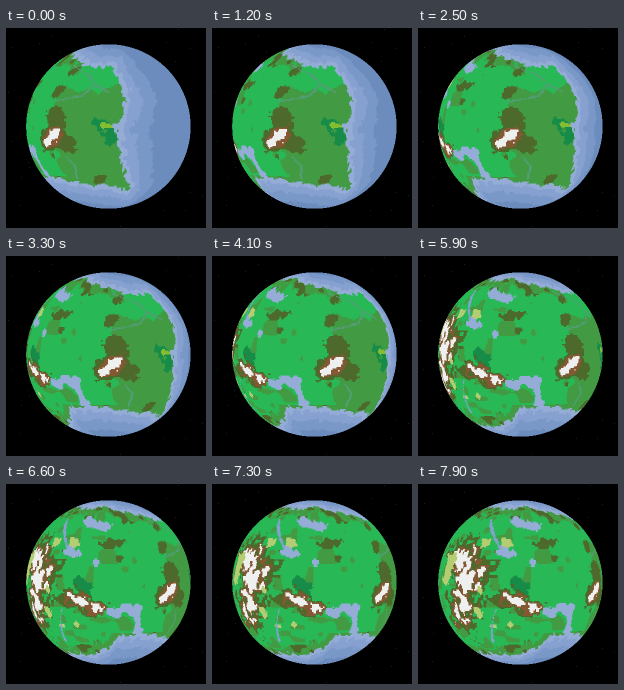
An HTML page with a canvas for the animation above (8000 ms loop, 200 by 200 pixels).

```html
<!DOCTYPE html>
<html lang="en">
<head>
<meta charset="utf-8">
<title>Rotating planet</title>
<style>
  html, body { margin: 0; width: 100%; height: 100%; overflow: hidden; background: #000; }
  canvas { display: block; width: 100vmin; height: 100vmin; }
</style>
</head>
<body>
<canvas id="stage" width="200" height="200"></canvas>
<script>
const LOOP = 8000, STEP = 100, SPIN = 13.87;   // ms, ms, degrees per second
const CX = 102.4, CY = 98.5, R = 82.2;
const TILT = 3 * Math.PI / 180, DEG = 180 / Math.PI;
const WEST = -210, COLS = 360, ROWS = 180;     // one map cell per degree

const color = {
  deep: [107, 140, 189], mid: [121, 152, 200], shallow: [134, 161, 207], shore: [148, 172, 214],
  bright: [40, 185, 86], green: [66, 155, 67], forest: [23, 140, 72], olive: [77, 105, 44],
  brown: [132, 88, 50], sand: [180, 204, 114], lime: [132, 189, 50], snow: [237, 240, 238],
  river: [82, 157, 118]
};

function hash(x, y, seed) {
  const v = Math.sin(x * 127.1 + y * 311.7 + seed * 74.7) * 43758.5453;
  return v - Math.floor(v);
}

// Smooth value noise between -0.5 and 0.5.
function noise(x, y, seed) {
  const ix = Math.floor(x), iy = Math.floor(y);
  const ease = t => t * t * (3 - 2 * t), mix = (a, b, t) => a + (b - a) * t;
  const row = j => mix(hash(ix, j, seed), hash(ix + 1, j, seed), ease(x - ix));
  return mix(row(iy), row(iy + 1), ease(y - iy)) - 0.5;
}

// Stage point to longitude and latitude, relative to the facing meridian.
function unproject(px, py) {
  const x = (px - CX) / R, y = (CY - py) / R;
  const z = Math.sqrt(Math.max(0, 1 - x * x - y * y));
  const lat = Math.asin(Math.max(-1, Math.min(1, y * Math.cos(TILT) + z * Math.sin(TILT))));
  const lon = Math.atan2(x, z * Math.cos(TILT) - y * Math.sin(TILT));
  return [lon * DEG, lat * DEG];
}

// Straight lines through a few key points.
function curve(keys) {
  return x => {
    const i = keys.findIndex(k => k[0] > x);
    if (i < 1) return keys[i === 0 ? 0 : keys.length - 1][1];
    const [[x0, y0], [x1, y1]] = [keys[i - 1], keys[i]];
    return y0 + (y1 - y0) * (x - x0) / (x1 - x0);
  };
}

const northCoast = curve([[-130, 67], [-95, 70], [-68, 62], [-50, 58], [-20, 51], [5, 48]]);
const southCoast = curve([[-112, -58], [-92, -51], [-82, -38], [-50, -37], [-14, -42], [20, -47]]);
const eastCoast = curve([[-42, 20], [-29, 11], [-10, 7], [3, 4], [14, 10], [26, 13], [46, 6]]);

// A band around a line of stage points seen at a given second; half widths in degrees.
function feature(sec, points, widths, rough = 5) {
  const line = points.map(([x, y]) => {
    const [lon, lat] = unproject(x, y);
    return [lon - SPIN * sec, lat];
  });
  return { line, widths: Object.entries(widths), rough };
}

const spots = (sec, points, widths, rough) => points.map(p => feature(sec, [p], widths, rough));

const features = [
  feature(0, [[95, 153]], { olive: 4 }),
  feature(0, [[88, 94], [104, 100], [105, 114]], { forest: 3 }),
  feature(0, [[98, 98], [111, 98]], { lime: 1.4 }, 2),
  feature(0, [[68, 37], [83, 47], [88, 56], [104, 65]], { river: 0.6 }, 1),
  feature(0, [[48, 73], [76, 68], [88, 57]], { river: 0.6 }, 1),
  feature(2.5, [[103, 128], [112, 138], [110, 151]], { river: 0.6 }, 1),
  feature(2.5, [[90, 90], [99, 90]], { olive: 6 }),
  feature(2.5, [[82, 115], [98, 106]], { olive: 9, brown: 5, snow: 3 }),
  feature(2.5, [[109, 116]], { olive: 6 }),
  feature(4.1, [[118, 65]], { olive: 4.5 }),
  feature(5.9, [[89, 60], [101, 59]], { olive: 4 }),
  feature(5.9, [[100, 74]], { olive: 2.5 }, 3),
  feature(7.9, [[100, 100], [106, 110]], { forest: 4 }),
  feature(7.9, [[82, 112], [97, 118], [114, 123]], { olive: 6.5 }, 8),
  feature(7.9, [[90, 115], [116, 124]], { brown: 4.5, snow: 2 }, 7),
  feature(7.9, [[42, 72], [55, 92], [42, 130]], { olive: 15, brown: 9, snow: 5.5 }, 15),
  feature(7.9, [[32, 78], [28, 95]], { sand: 6 }, 6),
  ...spots(7.9, [[68, 58], [90, 58], [60, 129]], { sand: 3.5 }, 4),
  ...spots(7.9, [[62, 107], [75, 142], [92, 141]], { sand: 2.2 }, 2),
  feature(7.9, [[73, 36], [76, 52], [84, 67]], { shallow: 0.8 }, 1),
  feature(7.9, [[78, 125], [74, 140], [75, 158]], { shallow: 0.7 }, 1),
  feature(7.9, [[84, 68], [94, 71]], { shore: 2.8 }, 3),
  feature(7.9, [[115, 79]], { shore: 2.2 }, 2),
  feature(7.9, [[98, 36], [108, 41], [118, 43]], { shore: 3.8 }, 4),
  feature(5.9, [[93, 128], [104, 125], [118, 126], [120, 142], [126, 156]], { shore: 3 }, 4)
];

function distance(lon, lat, line) {
  const squash = Math.cos(lat / DEG);
  let best = Infinity;
  line.forEach(([ax, ay], i) => {
    const [bx, by] = line[i + 1] || line[i];
    const dx = (bx - ax) * squash, dy = by - ay;
    const px = (lon - ax) * squash, py = lat - ay;
    const t = Math.max(0, Math.min(1, (px * dx + py * dy) / (dx * dx + dy * dy || 1)));
    best = Math.min(best, Math.hypot(px - t * dx, py - t * dy));
  });
  return best;
}

function seaColor(offshore) {
  return offshore < 5 ? 'shore' : offshore < 13 ? 'shallow' : offshore < 26 ? 'mid' : 'deep';
}

function landColor(lon, lat, offshore) {
  const patch = noise(lon / 8, lat / 6, 3);
  const polar = lat < -35 || (lat > 35 && lon < -30);
  if (lon > -42 + 14 * patch && lat < 30 + 12 * patch) return 'green';
  if (polar && offshore > -9 + 14 * patch) return patch < -0.2 ? 'olive' : 'green';
  return lon < -65 && patch > 0.25 ? 'green' : 'bright';
}

function terrain(lon, lat) {
  const ragged = noise(lon / 5, lat / 5, 1) + 0.8 * noise(lon / 2.3, lat / 2.3, 2);
  const offshore = Math.max(lon - eastCoast(lat), lat - northCoast(lon), southCoast(lon) - lat) + 5 * ragged;
  if (offshore > 0) return seaColor(offshore);
  let name = landColor(lon, lat, offshore);
  for (const { line, widths, rough } of features) {
    const d = distance(lon, lat, line) + rough * ragged;
    for (const [key, width] of widths) if (d < width) name = key;
  }
  return name;
}

function buildMap() {
  const map = [];
  for (let r = 0; r < ROWS; r++) for (let c = 0; c < COLS; c++) {
    map.push(color[terrain(c + 0.5 + WEST, 89.5 - r)]);
  }
  return map;
}

// Four samples per pixel of the disc, each with a fixed longitude and map row.
function buildDisc() {
  const disc = [];
  for (let y = 14; y < 184; y++) for (let x = 18; x < 188; x++) {
    const samples = [];
    for (let s = 0; s < 4; s++) {
      const px = x + 0.25 + (s & 1) / 2, py = y + 0.25 + (s >> 1) / 2;
      if (Math.hypot(px - CX, py - CY) > R) continue;
      const [lon, lat] = unproject(px, py);
      samples.push([lon - WEST, Math.min(ROWS - 1, Math.floor(90 - lat)) * COLS]);
    }
    if (samples.length) disc.push({ at: (y * 200 + x) * 4, samples });
  }
  return disc;
}

const ctx = document.getElementById('stage').getContext('2d');
ctx.fillRect(0, 0, 200, 200);
ctx.fillStyle = '#1c1d1f';
for (let i = 0; i < 40; i++) {
  ctx.fillRect(Math.floor(hash(i, 1, 5) * 200), Math.floor(hash(i, 2, 5) * 200), 1, 1);
}
const image = ctx.getImageData(0, 0, 200, 200);
const map = buildMap(), disc = buildDisc();

function render(sec) {
  for (const { at, samples } of disc) {
    let red = 0, green = 0, blue = 0;
    for (const [lon, row] of samples) {
      const [r, g, b] = map[row + Math.floor(lon - SPIN * sec)];
      red += r;
      green += g;
      blue += b;
    }
    image.data[at] = red / 4;
    image.data[at + 1] = green / 4;
    image.data[at + 2] = blue / 4;
  }
  ctx.putImageData(image, 0, 0);
}

const start = performance.now();
let shown = -1;
function tick() {
  const step = Math.floor(((performance.now() - start) % LOOP) / STEP);
  if (step !== shown) {
    shown = step;
    render(step * STEP / 1000);
  }
  requestAnimationFrame(tick);
}
tick();
</script>
</body>
</html>
```
